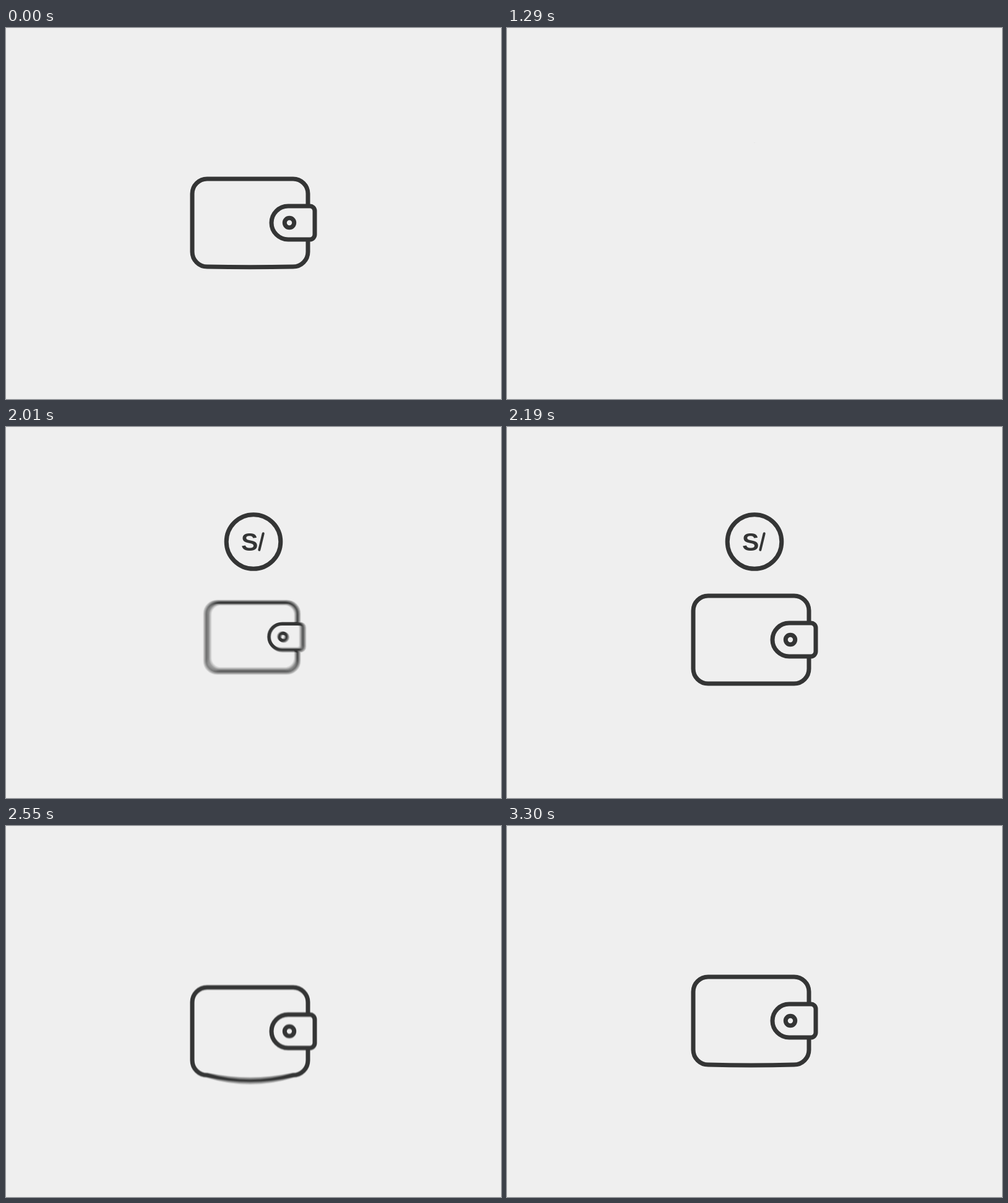
An HTML page with a canvas that plays this animation: 800x600 px, repeating every 3.54 s.

```html
<!DOCTYPE html>
<html lang="en">
<head>
<meta charset="utf-8">
<title>Coin and wallet</title>
<style>
  html, body { margin: 0; width: 100%; height: 100%; overflow: hidden; background: #efefef; }
  canvas { display: block; }
</style>
</head>
<body>
<canvas id="stage" width="800" height="600"></canvas>
<script>
const LOOP = 3540, STEP = 30, CUT = 300;
const SHUTTER = 15, SAMPLES = 16;
const BG = '#efefef', INK = '#343535';

const view = document.getElementById('stage').getContext('2d');
const layer = document.createElement('canvas');
layer.width = 800;
layer.height = 600;
const c = layer.getContext('2d');

const clamp = v => Math.min(1, Math.max(0, v));
const progress = (t, start, length) => clamp((t - start) / length);
const smooth = p => p * p * (3 - 2 * p);

// Cubic bezier easing with control points (x1, 0) and (x2, 1)
function ease(p, x1, x2) {
  let lo = 0, hi = 1;
  for (let i = 0; i < 24; i++) {
    const u = (lo + hi) / 2, v = 1 - u;
    if (3 * v * v * u * x1 + 3 * v * u * u * x2 + u * u * u < p) lo = u;
    else hi = u;
  }
  return lo * lo * (3 - 2 * lo);
}

const coinScale = t => ease(progress(t, 1260, 540), 0.5, 0.3);
const walletScale = t => ease(progress(t, 1795, 370), 0.8, 0.2);
const coinDrop = t => 81 * Math.pow(Math.max(0, t - 2196) / 174, 3);
const walletY = t => t < 2502 ? 29 : 29 * Math.exp((2502 - t) / 90);

function bulge(t) {
  if (t < 2424) return 0;
  if (t < 2465) return 25.6 * Math.sin(progress(t, 2424, 41) * Math.PI / 2);
  const rest = 1.6 * Math.exp((2465 - t) / 1500);
  return rest + 24 * (1 - smooth(progress(t, 2465, 135)));
}

function ink(width, cap = 'butt') {
  c.strokeStyle = c.fillStyle = INK;
  c.lineWidth = width;
  c.lineCap = cap;
}

function line(x1, y1, x2, y2) {
  c.beginPath();
  c.moveTo(x1, y1);
  c.lineTo(x2, y2);
  c.stroke();
}

function outline() {
  c.fillStyle = BG;
  c.fill();
  c.stroke();
}

function streak(t, x, y, growAt, leaveAt, speed) {
  const top = y + speed * Math.max(0, t - leaveAt);
  const end = Math.min(290, y + 2.7 * Math.max(0, t - growAt));
  if (end <= top) return;
  ink(4);
  line(x, top, x, end);
}

function drawCoin(t) {
  const s = coinScale(t);
  if (s <= 0 || t > 2440) return;
  c.save();
  c.translate(400, 185.5 + coinDrop(t));
  c.scale(s, s);
  ink(7);
  c.beginPath();
  c.arc(0, 0, 43.8, 0, Math.PI * 2);
  outline();
  ink(4, 'round');
  c.font = 'bold 41px "Liberation Sans", Arial, sans-serif';
  c.fillText('S', -20, 14.7);
  line(15.7, -13.3, 9.3, 13.3);
  c.restore();
}

function drawWallet(t) {
  const s = walletScale(t);
  if (s <= 0) return;
  c.save();
  c.translate(411, 294 + walletY(t));
  c.scale(s, s);
  c.translate(-411, -294);
  ink(7);

  const left = 301, right = 488, top = 244, bottom = 386, r = 24;
  c.beginPath();
  c.moveTo(left + r, top);
  c.arcTo(right, top, right, bottom, r);
  c.lineTo(right, bottom - r);
  c.arcTo(right, bottom, right - r, bottom, r);
  c.quadraticCurveTo((left + right) / 2, bottom + 2 * bulge(t), left + r, bottom);
  c.arcTo(left, bottom, left, top, r);
  c.arcTo(left, top, right, top, r);
  c.closePath();
  outline();

  c.beginPath();
  c.roundRect(429, 288, 70, 54, [27, 8, 8, 27]);
  outline();

  c.beginPath();
  c.arc(458, 315, 7.7, 0, Math.PI * 2);
  outline();
  c.restore();
}

function drawScene(t) {
  c.fillStyle = BG;
  c.fillRect(0, 0, 800, 600);
  streak(t, 331.5, 185, 2310, 2349, 2.4);
  streak(t, 460, 138, 2290, 2349, 2.7);
  drawCoin(t);
  drawWallet(t);
}

// Average several moments within the shutter for motion blur
function render(t) {
  for (let i = 0; i < SAMPLES; i++) {
    drawScene(t + SHUTTER * ((i + 0.5) / SAMPLES - 0.5));
    view.globalAlpha = 1 / (i + 1);
    view.drawImage(layer, 0, 0);
  }
}

const begin = performance.now();
let shown = -1;

function tick() {
  const now = (performance.now() - begin) % LOOP;
  const t = Math.floor(now / STEP) * STEP;
  if (t !== shown) {
    render(t < CUT ? t + LOOP : t);
    shown = t;
  }
  requestAnimationFrame(tick);
}
tick();
</script>
</body>
</html>
```
